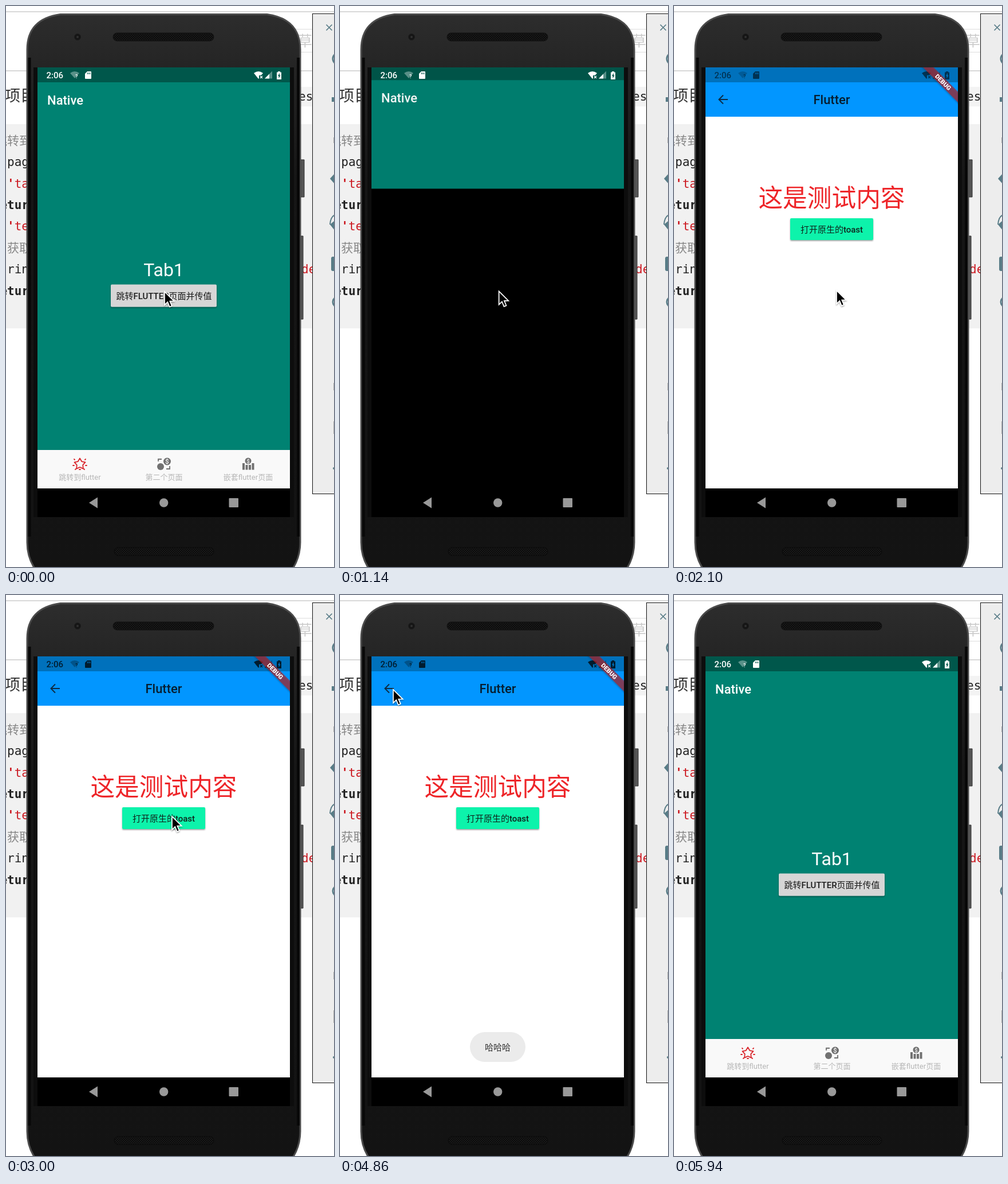
These frames come from a looping animation (573x978 px, 6000 ms). An HTML page:

```html
<!DOCTYPE html>
<html lang="zh-CN">
<head>
<meta charset="utf-8">
<style>
html, body { margin: 0; width: 100%; height: 100%; overflow: hidden; background: #fff; }
svg { display: block; width: 573px; height: 978px; }
text { font-family: Roboto, "Noto Sans CJK SC", "Noto Sans CJK", sans-serif; white-space: pre; }
.code text { font: 21px "DejaVu Sans Mono", "Noto Sans CJK SC", "Noto Sans CJK", monospace; }
.code .b { font-weight: bold; }
.m { font-weight: 500; }
.c { text-anchor: middle; }
</style>
</head>
<body>
<svg viewBox="0 0 573 978">
<defs>
  <linearGradient id="face" x2="0" y2="1">
    <stop stop-color="#2d2d2d"/><stop offset=".1" stop-color="#242424"/>
    <stop offset=".3" stop-color="#161616"/><stop offset="1" stop-color="#131313"/>
  </linearGradient>
  <pattern id="mesh" width="4" height="4" patternUnits="userSpaceOnUse">
    <rect width="4" height="4" fill="#0b0b0b"/><path d="M0 0h2v2H0zM2 2h2v2H2z" fill="#191919"/>
  </pattern>
  <filter id="soft" x="-20%" y="-30%" width="140%" height="170%">
    <feDropShadow dx="0" dy="1.5" stdDeviation="1.2" flood-opacity=".4"/>
  </filter>
  <clipPath id="screen"><rect x="55" y="107" width="441" height="784"/></clipPath>
  <clipPath id="reveal"><rect id="revealBox" x="55" y="107" width="441" height="784"/></clipPath>
</defs>

<!-- page behind the emulator -->
<path d="M0 10H573M0 113H536" stroke="#ccc" stroke-width="1.3"/>
<path d="M500 40.5H536M500 80.5H536" stroke="#ddd"/>
<text x="510" y="70" font-size="25" fill="#ccc">草稿</text>
<text x="-2" y="166" font-size="27" fill="#333">项目</text>
<rect x="500" y="141" width="36" height="34" fill="#f3f3f3"/>
<rect y="206" width="536" height="356" fill="#f1f1f1"/>
<g class="code" fill="#222">
  <text x="511" y="165">es</text>
  <text x="-19" y="242" fill="#888">跳转到</text>
  <text x="2" y="279">pag</text>
  <text x="2" y="317" fill="#cc1a22"><tspan class="b">'</tspan>ta</text>
  <text x="-10.6" y="354" class="b">etur</text>
  <text x="2" y="391" fill="#cc1a22"><tspan class="b">'</tspan>te</text>
  <text x="2" y="429" fill="#888">获取</text>
  <text x="2" y="466">rin</text>
  <text x="516" y="466" fill="#cc1a22">de</text>
  <text x="-10.6" y="504" class="b">etur</text>
</g>

<!-- emulator toolbar -->
<rect x="535.5" y="13.5" width="50" height="837" fill="#ededed" stroke="#111"/>
<g fill="none" stroke="#587c87" stroke-width="2">
  <path d="M559.500 32.500l10 10m0-10l-10 10" stroke-width="1.7"/>
  <circle cx="581" cy="92" r="10" stroke-width="3"/>
  <path d="M566 381q1-14 9-17" />
  <circle cx="580" cy="516" r="9" stroke-width="3"/>
  <path d="M572.500 229v10M572.500 657v13M572.500 724v22" stroke="#aaa" stroke-width="1"/>
</g>
<path d="M569 159h5v8h-5zM566 301l8-9v18zM566 381l8-7v17zM571 437h3v25h-3q-3 0-3-3v-19q0-3 3-3z" fill="#587c87"/>
<circle cx="573" cy="806" r="2" fill="#587c87"/>

<!-- phone body -->
<path d="M514 268h7v65h-7zM514 401h5v145h-5z" fill="#555" stroke="#333"/>
<path d="M37 76C37 40 56 20 95 14.500H456C495 20 514 40 514 76V935C514 955 508 970 500 982H51C43 970 37 955 37 935Z" fill="url(#face)" stroke="#4b4b4b" stroke-width="3"/>
<path d="M41 90V925M510.500 90V925" stroke="#080808" stroke-width="5"/>
<path d="M48 107h7v784h-7zM496 107h7v784h-7z" fill="#0d0d0d"/>
<rect x="187" y="47" width="176" height="14" rx="7" fill="url(#mesh)" stroke="#111"/>
<rect x="189" y="944" width="174" height="14" rx="7" fill="url(#mesh)" stroke="#0a0a0a"/>
<circle cx="125" cy="54" r="5.500" fill="#151515" stroke="#1d1d1d"/><circle cx="125" cy="54" r="2" fill="#303030"/>

<g clip-path="url(#screen)">
  <rect x="55" y="107" width="441" height="784"/>
  <g id="native">
    <rect x="55" y="107" width="441" height="734" fill="#008272"/>
    <rect x="55" y="107" width="441" height="26" fill="#00574b"/>
    <text class="m" x="72" y="171.500" font-size="22" fill="#fff">Native</text>
    <text class="c" x="275.500" y="470.500" font-size="32" fill="#fff">Tab1</text>
    <rect id="button" x="183" y="485.500" width="185" height="39" rx="2" filter="url(#soft)"/>
    <text class="c" x="276" y="510.500" font-size="15" fill="#1c1c1c">跳转<tspan class="m">FLUTTER</tspan>页面并传值</text>
    <rect x="55" y="774" width="441" height="67" fill="#f9f9f9"/>
    <g class="c" font-size="13" fill="#b6b6b6">
      <text x="129" y="826">跳转到flutter</text><text x="276" y="826">第二个页面</text><text x="423" y="826">嵌套flutter页面</text>
    </g>
    <g fill="none" stroke="#d9252b" stroke-width="1.800" stroke-linejoin="round">
      <path id="star"/>
      <path d="M119 790l1 1M139 790l-1 1M117 801h2M139 801h2M128 808h2M122 807l-1 1M136 807l1 1" stroke-linecap="round"/>
    </g>
    <g fill="#717171">
      <circle cx="281.500" cy="794" r="6.500"/><circle cx="270" cy="803" r="6"/>
      <path d="M266 794v-4h6M286 802v5h-6" fill="none" stroke="#717171" stroke-width="1.800"/>
      <circle cx="423" cy="793" r="5.500"/>
      <path d="M413 797h4v11.500h-4zM418.500 800h4v8.500h-4zM424 800h4v8.500h-4zM429.500 797h4v11.500h-4z"/>
      <g class="c m" fill="#fff"><text x="281.500" y="798" font-size="11">$</text><text x="423" y="796.500" font-size="9">$</text></g>
    </g>
    <rect x="55" y="841" width="441" height="80"/>
    <rect id="dim" x="55" y="107" width="441" height="734"/>
  </g>

  <g clip-path="url(#reveal)">
    <g id="flutter">
      <rect x="55" y="107" width="441" height="734" fill="#fff"/>
      <rect x="55" y="107" width="441" height="86" fill="#0296ff"/>
      <rect x="55" y="107" width="441" height="26" fill="#0071bc"/>
      <path d="M94 163H78.500M86 155.500L78.500 163l7.500 7.500" fill="none" stroke="#0d2c45" stroke-width="2"/>
      <text class="c m" x="275.500" y="171" font-size="22" fill="#071d30">Flutter</text>
      <text class="c" x="275.500" y="350" font-size="42.700" fill="#ee2529">这是测试内容</text>
      <rect x="203" y="370" width="145" height="38" rx="2" fill="#09f3ab" filter="url(#soft)"/>
      <text class="c" x="275.500" y="395" font-size="15" fill="#10231c">打开原生的<tspan class="m">toast</tspan></text>
      <rect x="55" y="841" width="441" height="50"/>
    </g>
    <rect id="launch" x="55" y="107" width="441" height="784"/>
  </g>

  <!-- system bars -->
  <g id="status">
    <text class="m" x="70.500" y="126" font-size="15">2:06</text>
    <path d="M112 117q8-6 16 0l-8 9z" opacity=".35"/>
    <text class="m" x="121" y="126" font-size="9">?</text>
    <path d="M142 114h6q1 0 1 1v11q0 1-1 1h-9q-1 0-1-1v-8zM142 116v3h1v-3zm2.200 0v3h1v-3zm2.200 0v3h1v-3z" fill-rule="evenodd"/>
    <path d="M433 117q8-6 16 0l-3 3.500-4 .5v5l-1 1z"/>
    <path d="M444 122l4 4m0-4l-4 4" stroke="currentColor" stroke-width="1.300"/>
    <path d="M452 126.500l13-13v13z" opacity=".35"/><path d="M452 126.500l8-8v8z"/>
    <path d="M475 114h4v1.500h2V128h-8v-12.500h2zM478 117l-3 5h1.500v4l3-5H478z" fill-rule="evenodd"/>
  </g>
  <g id="banner"><g clip-path="url(#reveal)">
    <g transform="translate(496 107) rotate(45)">
      <rect x="-60" y="30" width="120" height="13" fill="#b71c1c" fill-opacity=".63" filter="url(#soft)"/>
      <text class="c" x="0" y="40.300" font-size="10.800" font-weight="900" fill="#fff">DEBUG</text>
    </g></g>
  </g>
  <g fill="#999"><path d="M145 866l15-9.500v19z"/><circle cx="275.700" cy="866" r="7.700"/><rect x="389.500" y="858" width="16.500" height="16" rx="1"/></g>
  <g id="toast">
    <rect x="227" y="762" width="97" height="52" rx="26" fill="#ebebeb"/>
    <text class="c" x="275.500" y="794" font-size="15" fill="#303030">哈哈哈</text>
  </g>
</g>

<path id="cursor" d="M0 0V23L5.300 18 8.800 26.500 12.800 24.800 9.300 16.500H16.600Z" stroke="#fff" stroke-width="1.700" filter="url(#soft)"/>
</svg>

<script>
const LOOP = 6000, OPEN = 1040, CLOSE = 4890, SLIDE = 425, READY = 2040;
const el = id => document.getElementById(id);
const set = (id, attrs) => { for (const k in attrs) el(id).setAttribute(k, attrs[k]); };
const ramp = (t, a, b) => Math.min(1, Math.max(0, (t - a) / (b - a)));
const smooth = u => u * u * (3 - 2 * u);

// y at a given x on the cubic through four [x, y] points
function curve(x, ...p) {
  const at = (t, i) => (1 - t) ** 3 * p[0][i] + 3 * t * (1 - t) ** 2 * p[1][i] + 3 * t * t * (1 - t) * p[2][i] + t ** 3 * p[3][i];
  let lo = 0, hi = 1;
  for (let n = 0; n < 24; n++) {
    const mid = (lo + hi) / 2;
    if (at(mid, 0) < x) lo = mid; else hi = mid;
  }
  return at(hi, 1);
}
const fastOutSlowIn = x => curve(x, [0, 0], [.4, 0], [.2, 1], [1, 1]);
const extraSlowIn = x => x < 1 / 6
  ? curve(x, [0, 0], [.05, 0], [.1333, .06], [.1667, .4])
  : curve(x, [.1667, .4], [.2083, .82], [.25, 1], [1, 1]);

// pointer stops: time, x, y
const stops = [
  [0, 277, 498], [720, 277, 498], [840, 275, 498], [1040, 275, 498], [1320, 284, 496], [2400, 284, 496],
  [3000, 290, 386], [3240, 290, 386], [3840, 182, 753], [3900, 182, 753], [4620, 93, 165],
  [5460, 93, 165], [5880, 300, 985], [LOOP, 300, 985]
];
function pointer(t) {
  const i = stops.findIndex(s => s[0] > t), [t0, x0, y0] = stops[i - 1], [t1, x1, y1] = stops[i];
  const u = smooth(ramp(t, t0, t1));
  return [x0 + (x1 - x0) * u, y0 + (y1 - y0) * u];
}

const corners = Array.from({ length: 10 }, (_, i) => {
  const r = i % 2 ? 5.5 : 10, a = (i / 5 - .5) * Math.PI;
  return [129 + r * Math.cos(a), 798.5 + r * Math.sin(a)];
});
set('star', { d: 'M' + corners.join('L') + 'Z' });

function render(t) {
  const closing = t >= CLOSE;
  const x = ramp(t, closing ? CLOSE : OPEN, (closing ? CLOSE : OPEN) + SLIDE);
  const flip = v => closing ? 1 - v : v;
  const move = flip(fastOutSlowIn(x)), shown = flip(extraSlowIn(x));
  const drop = 32 * (1 - move), ready = t >= READY;
  const dark = ready && t < 5400;

  set('native', { transform: `translate(0 ${-18 * move})` });
  set('dim', { opacity: .17 * move });
  set('flutter', { transform: `translate(0 ${drop})`, visibility: ready && move > 0 ? 'visible' : 'hidden' });
  set('launch', { visibility: !ready && t > OPEN ? 'visible' : 'hidden' });
  set('revealBox', { y: 107 + drop + .945 * 784 * (1 - shown) });
  set('banner', { visibility: ready && move > 0 ? 'visible' : 'hidden' });
  set('status', {
    fill: dark ? '#000' : '#fff', color: dark ? '#000' : '#fff',
    opacity: dark ? .45 + .3 * ramp(t, READY, 2220) : 1
  });

  const gray = 214 - 37 * (ramp(t, 720, 840) - ramp(t, 1040, 1300));
  set('button', { fill: `rgb(${gray},${gray},${gray})` });
  set('toast', { opacity: ramp(t, 3240, 3540) - ramp(t, 5300, 5600) });
  set('cursor', { transform: `translate(${pointer(t)})` });
}

function tick() {
  render(performance.now() % LOOP);
  requestAnimationFrame(tick);
}
tick();
</script>
</body>
</html>
```
